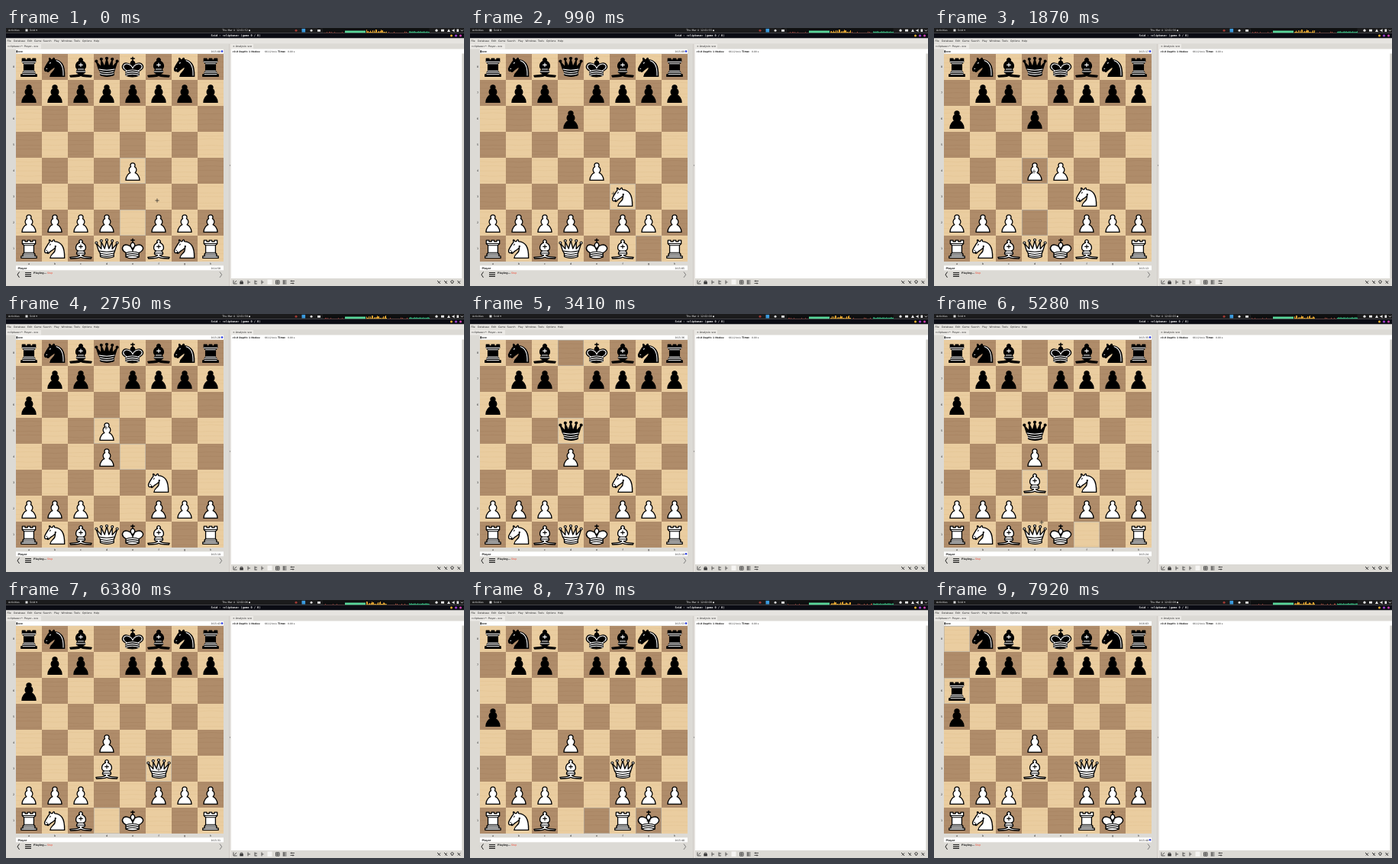
Animation of 600x338 px, one loop 8000 ms. Source, as an HTML page:

```html
<!DOCTYPE html>
<html lang="en">
<head>
<meta charset="utf-8">
<title>Chess game</title>
<style>
html, body { margin: 0; width: 100%; height: 100%; overflow: hidden; background: #dcdad5; }
svg { display: block; width: 100vw; height: 100vh; }
text { font-family: "DejaVu Sans", sans-serif; fill: #222; white-space: pre; }
.b { font-weight: bold; }
.w { fill: #eee; }
.red { fill: #f0402a; }
.mono { font-family: "DejaVu Sans Mono", monospace; }
.m { text-anchor: middle; }
.e { text-anchor: end; }
</style>
</head>
<body>
<svg viewBox="0 0 600 338" xmlns="http://www.w3.org/2000/svg">
  <defs id="defs"></defs>
  <g id="chrome"></g>
  <g id="graph"></g>
  <g id="board"></g>
  <g id="marks"></g>
  <g id="pieces"></g>
  <path id="cursor" d="M-2.6 0H2.6M0-2.6V2.6" stroke="#222" stroke-width=".7"/>
  <g id="labels"></g>
</svg>
<script>
const LOOP = 8000, CELL = 34, LEFT = 13, TOP = 34;
const $ = id => document.getElementById(id);

function add(parent, tag, attrs, text) {
  const el = document.createElementNS("http://www.w3.org/2000/svg", tag);
  for (const k in attrs) el.setAttribute(k, attrs[k]);
  if (text !== undefined) el.textContent = text;
  parent.appendChild(el);
  return el;
}
const rect = (p, x, y, width, height, fill) => add(p, "rect", { x, y, width, height, fill });
const label = (p, x, y, text, cls = "", size = 3.4) => add(p, "text", { x, y, class: cls, "font-size": size }, text);
const line = (p, d, stroke = "#333", width = .8, opacity = 1) =>
  add(p, "path", { d, fill: "none", stroke, "stroke-width": width, opacity });
const dot = (p, cx, cy, r, fill) => add(p, "circle", { cx, cy, r, fill });

function random(seed) {
  const v = Math.sin(seed * 127.1 + 11.7) * 43758.5453;
  return v - Math.floor(v);
}

// Each piece on a 45 unit grid: body outline, inner detail, horizontal scale
const shapes = {
  P: ["M22.5 9c-2.2 0-4 1.8-4 4 0 .9.3 1.7.8 2.4C17.3 16.5 16 18.6 16 21c0 2 .9 3.8 2.4 5C15.4 27.1 10.5 31.6 10.5 39h24c0-7.4-4.9-11.9-7.9-13 1.5-1.2 2.4-3 2.4-5 0-2.4-1.3-4.5-3.3-5.6.5-.7.8-1.5.8-2.4 0-2.2-1.8-4-4-4z", "", 1],
  R: ["M9 39h27v-3.5h-3V32l-2-2.5V17l3-3V8h-5v2.5h-4V8h-5v2.5h-4V8h-5v6l3 3v12.5L12 32v3.5H9z", "M12 35.5h21M12 32h21M14 29.5h17M14 17h17M11 14h23", 1],
  N: ["M22 10c10.5 1 16.5 8 16 29H15c0-9 10-6.5 8-21l1 0c.4 2.9-5.6 7.4-8 9-3 2-2.8 4.3-5 4-1-.9 1.4-3 0-3-1 0 .2 1.2-1 2-1 0-4 1-4-4 0-2 6-12 6-12s1.9-1.9 2-3.5c-.7-1-.5-2-.5-3 1-1 3 2.5 3 2.5h2s.8-2 2.5-3c1 0 1 3 1 3z", "M9 25.5h.8M14.6 16.2l.8-1.4", 1.08],
  B: ["M4.5 37.500c6-1.200 13.500.3 16.200-3.500-2 0-4.200-.8-5.200-2v-1.500c0-2.500 2.500-4 2.500-4-5-2-5.500-10.500 2.500-14.500a2.800 2.800 0 1 1 4 0c8 4 7.500 12.500 2.500 14.500 0 0 2.500 1.500 2.500 4V32c-1 1.200-3.200 2-5.200 2 2.700 3.800 10.200 2.300 16.200 3.500l-1 2.200c-6-1-12.500.8-17-2.200-4.500 3-11 1.200-17 2.200z", "M18 26.500h9M15.500 30.500h14M22.500 16v6M19.500 19h6", 1.04],
  Q: ["M9.500 27L5.500 13.500l8 9.500V10.500l5.500 12 3.500-14 3.500 14 5.500-12V23l8-9.500-4 13.500c-1.500 2.500-2 5-1.500 9.500-4.500 3-17.500 3-22 0 .5-4.500 0-7-2.500-9.500z", "M10 26.500c8 2 17 2 25 0M11.500 30.500c7 2.300 15 2.300 22 0M11.500 34c6 2.500 16 2.500 22 0", 1.06],
  K: ["M22.5 25s4.5-7.5 3-10.5c0 0-1-2.5-3-2.5s-3 2.5-3 2.5c-1.5 3 3 10.5 3 10.5zM11.5 37c5.5 3.5 15.5 3.5 21 0v-7s9-4.5 6-10.5c-4-6.5-13.5-3.5-16 4V27v-3.5c-3.5-7.5-13-10.5-16-4-3 6 5 10 5 10z", "M11.500 30c5.500-3 15.500-3 21 0M11.500 33.500c5.500-3 15.500-3 21 0M11.500 37c5.500-3 15.500-3 21 0", 1.08]
};
// White contours on black pieces
const contours = {
  N: "M25 11.5c8 2.5 11.5 10 11 26",
  K: "M32 28.500s7.500-3.500 5-8.500c-3.500-5-12-2.500-14.500 5C20 17.500 11.500 15 8 20c-2.500 5 4.500 8.500 4.500 8.500"
};

function definePieces() {
  for (const side of "wb") for (const kind in shapes) {
    const [body, detail, sx] = shapes[kind], white = side === "w";
    const fill = white ? "#fff" : "#000", ink = white ? "#000" : "#fff";
    const g = add($("defs"), "g", {
      id: side + kind, "stroke-linejoin": "round", "stroke-linecap": "round", fill,
      transform: `translate(17 17) scale(${sx * CELL / 45} ${CELL / 45}) translate(-22.5 -22.5)`
    });
    if (kind === "K") line(g, "M22.5 12V5.5M19.7 8h5.6", "#000", 1.8);
    add(g, "path", { d: body, stroke: "#000", "stroke-width": 1.7 });
    if (kind === "Q") for (const [cx, cy] of [[5.5, 12.5], [13.5, 9], [22.5, 7.5], [31.5, 9], [39.5, 12.5]])
      add(g, "circle", { cx, cy, r: 1.9, stroke: "#000", "stroke-width": 1.4 });
    line(g, detail, ink, 1.4);
    if (!white && contours[kind]) line(g, contours[kind], ink, 1.3);
  }
}

function drawChrome() {
  const c = $("chrome");
  rect(c, 0, 0, 600, 338, "#dcdad5");
  rect(c, 0, 0, 600, 6.5, "#1b1b1c");
  rect(c, 0, 6.5, 600, 7, "#0b0c14");
  label(c, 3, 4.4, "Activities", "w", 3.2);
  rect(c, 25.5, 1.5, 3, 3, "#ddd");
  label(c, 31, 4.4, "Scid ▾", "w");
  dot(c, 319, 3.2, 1, "#eee");
  label(c, 301, 11.4, "Scid - <clipbase> (game 0 / 0)", "b w m mono", 3.6);
  ["#f0b030", "#a040d8", "#d040b0"].forEach((fill, i) => dot(c, 583.5 + i * 6, 10, 1.5, fill));

  dot(c, 380, 3.2, 1.5, "#a33a34");
  rect(c, 387.5, .9, 4.6, 4.6, "#3b9be0");
  dot(c, 400, 3.2, 1.5, "#ddd");
  rect(c, 408, 2, 4, 2.8, "#ddd");
  dot(c, 564, 3.2, 1.6, "#eee");
  rect(c, 570, 1.8, 4, 2.8, "#eee");
  add(c, "path", { d: "M578 4.9l2-3.600 2 3.600zM584.500 2.400h1.300l1.700-1.400v4.400l-1.700-1.400h-1.300zM590.500 1.500h2.600v3.600h-2.600z", fill: "#eee" });
  line(c, "M596 2.500l1.400 1.600 1.400-1.600", "#eee");

  rect(c, 0, 13.5, 600, 7, "#e6e4e0");
  const menu = { File: 1.5, Database: 10, Edit: 28, Game: 37, Search: 48.5, Play: 63, Windows: 72.5, Tools: 89, Options: 100, Help: 115 };
  for (const name in menu) label(c, menu[name], 18.2, name, "", 3.2);

  rect(c, 0, 21, 46, 6.5, "#ebe9e5");
  label(c, 1.5, 25.2, "<clipbase>*: Player--:sce", "", 3.2);
  rect(c, 295, 21, 29, 6.5, "#ebe9e5");
  label(c, 297, 25.2, "× Analysis: sce", "", 3.3);
  rect(c, 292.3, 21, 1, 317, "#cac7c1");
  rect(c, 293.3, 21, 1.4, 317, "#e8e6e2");
  dot(c, 293.5, 180, .7, "#888");

  rect(c, 295, 27.5, 305, 300.5, "#fff");
  rect(c, 597.3, 33.5, 2.7, 294.5, "#d6d4cf");
  label(c, 296, 31.5, "+0.0 Depth: 1 Nodes:", "b", 3.1);
  label(c, 339, 31.5, "66.12 kn/s", "", 3);
  label(c, 356, 31.5, "Time:", "b", 3.3);
  label(c, 369, 31.5, "0.00 s", "", 3);

  rect(c, LEFT, 27.8, 272, 5.6, "#fff");
  rect(c, LEFT, 311.3, 272, 6, "#fff");
  rect(c, 13.6, 29.3, 1.4, 3, "#111");
  label(c, 15.5, 32, "sce", "b");
  label(c, 15.5, 315.7, "Player", "b");
  for (let i = 0; i < 8; i++) {
    label(c, 10, TOP + i * CELL + 18, 8 - i, "m");
    label(c, LEFT + (i + .5) * CELL, 310, "abcdefgh"[i], "m");
  }

  line(c, "M17.5 319.5l-2.5 3.7 2.5 3.700", "#222", 1);
  line(c, "M280 319.5l2.700 3.700-2.700 3.700", "#666");
  line(c, "M25 320.500h8M25 322.900h8M25 325.300h8", "#222", 1.2);
  label(c, 36, 322, "Playing...", "b", 3.3);
  label(c, 54, 322, "Stop", "red", 3.2);

  rect(c, 342.5, 329.5, 6, 6.5, "#f5f4f2");
  rect(c, 306.300, 332.500, 4.500, 3, "#333");
  line(c, "M298 330.500v4.500h4.500M299.500 333.500l2.500-2.500M307.300 333v-1.700h2.400V333M317 330.500v5M317 333h3M326 330.500v5M326 332h3M326 335h3M335 330.500v5M335 333h2.500");
  line(c, "M353.500 330.800h4.500v4.500h-4.500zM353.500 333h4.500M355.700 330.800v4.500M362.500 331h5M362.500 333h5M362.500 335h5M364 330.500v5M372.500 331.500h5.500M372.500 334.500h5M374 330.500v2M376 333.500v2");
  line(c, "M565 331l4 4M569 331.500l-3 3M574 331l4 4M575.500 334.500l2-3M582.500 332l2-1.500 2 1.500-2 3zM591.500 331l3.500 4M595 331.500l-3 3", "#333", 1);
}

function drawBoard() {
  const b = $("board");
  for (let r = 0; r < 8; r++) for (let f = 0; f < 8; f++) {
    const x = LEFT + f * CELL, y = TOP + r * CELL, dark = (r + f) % 2;
    rect(b, x, y, CELL, CELL, dark ? "#af8c6a" : "#eacda0");
    let d = "";
    for (let k = 0; k < 5; k++) {
      const v = y + 3 + k * 6.5 + random(r * 40 + f * 5 + k) * 3;
      d += `M${x} ${v}q17 ${(random(f * 9 + k + r) - .5) * 4} 34 0`;
    }
    line(b, d, dark ? "#9a7755" : "#d9b987", .9, .3);
  }
}

// time, moves, mover's clock in seconds after the move
const moves = [
  [0, "e2e4", 898], [220, "d7d6", 909], [770, "g1f3", 905], [1210, "a7a6", 917],
  [1760, "d2d4", 913], [2090, "d6d5", 926], [2640, "e4d5", 919], [3190, "d8d5", 936],
  [4400, "f1d3", 924], [5720, "d5f3", 943], [6270, "d1f3", 931], [6600, "a6a5", 953],
  [7150, "e1g1 h1f1", 940], [7480, "a8a6", 963]
];

const pointer = [
  [0, 198, 226], [330, 225, 284], [450, 233, 289], [750, 193, 221], [900, 196, 223], [990, 188, 217],
  [1210, 188, 217], [1430, 131, 256], [1700, 131, 188], [1900, 131, 188], [2250, 165, 188],
  [2600, 131, 149], [3500, 131, 149], [4000, 200, 290],
  [4350, 131, 222], [4800, 131, 222], [5100, 141, 273], [5400, 141, 273], [5900, 131, 290],
  [6250, 200, 222], [6500, 200, 222], [6800, 166, 290], [7100, 234, 290], [8000, 234, 290]
];

const square = s => ({ x: LEFT + "abcdefgh".indexOf(s[0]) * CELL, y: TOP + (8 - s[1]) * CELL });

function startBoard() {
  const board = {};
  [..."abcdefgh"].forEach((f, i) => {
    board[f + 1] = "w" + "RNBQKBNR"[i];
    board[f + 2] = "wP";
    board[f + 7] = "bP";
    board[f + 8] = "b" + "RNBQKBNR"[i];
  });
  return board;
}

let shown = 0;
function showPosition(count) {
  if (count === shown) return;
  shown = count;
  const board = startBoard();
  for (const [, text] of moves.slice(0, count)) for (const m of text.split(" ")) {
    board[m.slice(2)] = board[m.slice(0, 2)];
    delete board[m.slice(0, 2)];
  }
  $("pieces").replaceChildren();
  for (const s in board) add($("pieces"), "use", { href: "#" + board[s], ...square(s) });
  $("marks").replaceChildren();
  const last = moves[count - 1][1];
  for (const s of [last.slice(0, 2), last.slice(2, 4)]) {
    const { x, y } = square(s);
    add($("marks"), "rect", { x: x + .3, y: y + .3, width: 33.4, height: 33.4, fill: "none", stroke: "#b5b0a5", "stroke-width": .6 });
  }
}

function pointerAt(t) {
  const i = pointer.findIndex(p => p[0] > t), a = pointer[i - 1], b = pointer[i];
  let u = (t - a[0]) / (b[0] - a[0]);
  u = u * u * (3 - 2 * u);
  return [a[1] + (b[1] - a[1]) * u, a[2] + (b[2] - a[2]) * u];
}

const two = n => String(n).padStart(2, "0");
const clockText = s => `0:${two(Math.floor(s / 60))}:${two(s % 60)}`;

// Load meters in the top bar: colour and bar height for a random value
const meters = [
  ["#a8403a", n => n > .85 ? n : .2],
  ["#58d69a", () => 2.6],
  ["#dca030", n => .8 + n * n * 3.5],
  ["#b04a3a", n => n > .8 ? n * 1.5 : .2],
  ["#2fa873", n => .9 + n]
];
let bars, time, clocks, turn;

function drawMeters() {
  const g = $("graph");
  rect(g, 415, .4, 139.5, 5.8, "#0e0f10");
  bars = meters.map(([fill]) => add(g, "path", { fill }));
}

function updateMeters(t) {
  const step = Math.floor(t / 500);
  bars.forEach((bar, k) => {
    let d = "";
    for (let i = 0; i < 27; i++) {
      const h = meters[k][1](random(i + step + k * 90));
      d += `M${416 + k * 28 + i} 6.2v${-h}h1v${h}z`;
    }
    bar.setAttribute("d", d);
  });
}

function draw(t) {
  const count = moves.filter(m => m[0] <= t).length;
  showPosition(count);

  const left = [900, 900];
  moves.slice(0, count).forEach((m, i) => left[i % 2] = m[2]);
  const side = count % 2;
  left[side] -= Math.floor((t - moves[count - 1][0]) / 500);
  clocks.forEach((el, i) => el.textContent = clockText(left[i]));
  turn.setAttribute("cy", side ? 30.6 : 314.3);

  const sec = Math.floor(52.98 + t * .00206);
  time.textContent = `Thu Mar 4  12:${two(1 + Math.floor(sec / 60))}:${two(sec % 60)}`;
  $("cursor").setAttribute("transform", `translate(${pointerAt(t)})`);
  updateMeters(t);
}

definePieces();
drawChrome();
drawMeters();
drawBoard();
time = label($("labels"), 300, 4.4, "", "w m", 3.3);
clocks = [315.7, 32].map(y => label($("labels"), 281, y, "", "e", 3.2));
turn = dot($("labels"), 283, 30.6, 1.3, "#2a3be0");

const begin = performance.now();
function frame() {
  draw((performance.now() - begin) % LOOP);
  requestAnimationFrame(frame);
}
frame();
</script>
</body>
</html>
```
